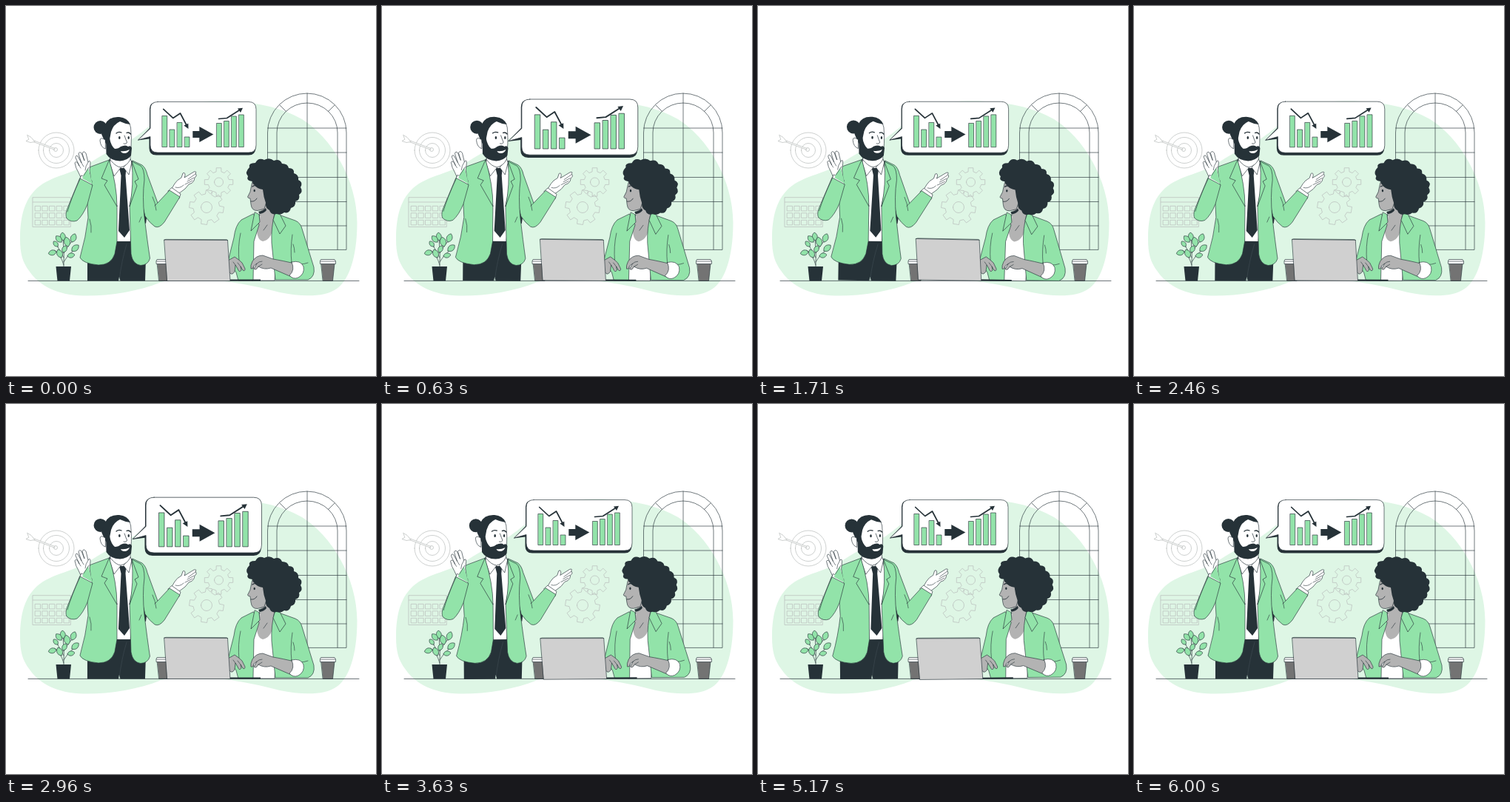
An HTML page with a canvas that plays this animation: 500x500 px, repeating every 6.04 s.

```html
<!DOCTYPE html>
<html lang="en">
<head>
<meta charset="utf-8">
<title>Business talk</title>
<style>
html, body { margin: 0; width: 100%; height: 100%; overflow: hidden; background: #fff; }
canvas { display: block; width: 500px; height: 500px; }
</style>
</head>
<body>
<canvas id="stage"></canvas>
<script>
const DARK = '#263238', GREEN = '#92e3a9', PALE = '#def6e5', SKIN = '#b3b3b3', GREY = '#b8bcba', WHITE = '#fff';
const LOOP = 6040, CYCLE = 6000;
const canvas = document.getElementById('stage');
const ctx = canvas.getContext('2d');
const ratio = window.devicePixelRatio || 1;
canvas.width = canvas.height = 500 * ratio;

// Each part: path, fill, stroke, line width
const part = (d, fill, stroke, width = 0.65) => ({ path: new Path2D(d), fill, stroke, width });
const inked = (d, fill) => part(d, fill, DARK);
const line = (d, width = 0.65, color = DARK) => part(d, null, color, width);
const solid = (d, fill = DARK) => part(d, fill);

function draw(parts) {
  for (const p of parts) {
    if (p.fill) { ctx.fillStyle = p.fill; ctx.fill(p.path); }
    if (p.stroke) { ctx.strokeStyle = p.stroke; ctx.lineWidth = p.width; ctx.stroke(p.path); }
  }
}

const circle = (x, y, r) => `M${x - r} ${y}a${r} ${r} 0 1 0 ${2 * r} 0a${r} ${r} 0 1 0 ${-2 * r} 0Z`;
const box = (x, y, w, h) => `M${x} ${y}h${w}v${h}h${-w}Z`;

function gear(x, y, outer, body, hole, turn) {
  let d = '';
  for (let i = 0; i < 8; i++) {
    const a = turn + i * Math.PI / 4;
    for (const [da, r] of [[-0.24, body], [-0.17, outer], [0.17, outer], [0.24, body]]) {
      d += `${d ? 'L' : 'M'}${x + r * Math.cos(a + da)} ${y + r * Math.sin(a + da)}`;
    }
  }
  return line(d + 'Z' + circle(x, y, hole), 0.7, GREY);
}

function leaf(x, y, angle, len) {
  const c = Math.cos(angle), s = Math.sin(angle);
  const at = (u, v) => `${x + (u * c - v * s) * len} ${y + (u * s + v * c) * len}`;
  return inked(`M${at(0, 0)}C${at(0.25, -0.45)} ${at(0.75, -0.4)} ${at(1, 0)}C${at(0.75, 0.4)} ${at(0.25, 0.45)} ${at(0, 0)}`, GREEN);
}

function cup(x) {
  return [
    inked(`M${x - 9} 348H${x + 9}L${x + 6.5} 371.4H${x - 6.5}Z`, '#737373'),
    inked(`M${x - 9} 342.5H${x + 9}L${x + 10.5} 345V348.5H${x - 10.5}V345Z`, WHITE),
    line(`M${x - 10} 345H${x + 10}`, 0.6)
  ];
}

const calendar = [line(box(36.3, 258.7, 51, 39.8) + 'M36.3 265H87.3', 0.7, GREY)];
for (let row = 0; row < 3; row++) {
  for (let col = 0; col < 5; col++) {
    calendar.push(line(box(39.5 + col * 9.7, 270.3 + row * 9.5, 7, 6.6), 0.7, GREY));
  }
}

const scene = [
  solid('M19 315C19 280 27 255 50 240C72 227 92 226 115 211C135 198 152 190 172 179C200 160 225 128.5 285 128.5C335 128 372 137 400 153C440 178 474.500 235 474.500 293C474.500 340 463 371 447 382C430 394 400 393 370 387C320 373 250 363 210 373C178 386 140 392 105 391.500C70 391 45 378 32 359C22 346 19 334 19 315Z', PALE),
  line('M353.500 329V171A53.250 53 0 0 1 460 171V329ZM366 329V171A41 40 0 0 1 448 171V329'),
  line('M407 118V329M353.500 165H460M353.500 198H460M353.500 231.500H460M353.500 264.500H460M353.500 297H460M370 134L378.500 142.500M444 134L435.500 142.500'),
  line(circle(68, 195, 24) + circle(68, 195, 17.5) + circle(68, 195, 9.5) + circle(67, 194, 2.5), 0.7, GREY),
  part('M35.500 181L66 192.500L65.500 194.200L34.900 182.700Z', WHITE, GREY, 0.7),
  part('M29 174.500L34 177.500L39 183.500L33 184.500L27 182.500L30.500 180.500Z', WHITE, GREY, 0.7),
  ...calendar,
  gear(271, 272, 23.5, 18, 7.5, 0.15),
  gear(287.5, 238, 19.5, 14.5, 6, 0),
  line('M78 352Q79 334 77 314M78 350Q74 336 66 330M78 346Q84 336 92 330M78 340Q73 330 69 324M78 334Q83 325 89 318'),
  leaf(77.5, 317, -1.7, 11), leaf(70, 325, -2.25, 9), leaf(75, 319, -2.3, 11),
  leaf(89, 319, -1.2, 12), leaf(84, 325, -1.8, 13), leaf(89, 331, -0.7, 12),
  leaf(83, 338, -0.2, 10), leaf(68, 332, 2.9, 11), leaf(75, 340, -2, 12), leaf(77, 333, -1.15, 10),
  solid('M67.500 352H88L86 371.400H69.500Z'),
  ...cup(213.5), ...cup(435),
  line('M30 371.400H477', 0.7)
];

const bar = (x, top) => inked(box(x, top, 6.5, 190.5 - top), GREEN);
const bubble = [
  solid('M202 130H330Q338 131 337.500 139V192Q337 201.500 328 201.500H203Q193.500 201.500 193.500 192V179.500L178 181.500L194 165V139Q194 131 202 130Z'),
  inked('M205 129.500H328Q338 129.500 338 139.500V188Q338 198 328 198H205Q195 198 195 188V176.500L178.500 181L195 165.500V139.500Q195 129.500 205 129.500Z', WHITE),
  bar(211.2, 148.5), bar(221.3, 167), bar(231.4, 157.5), bar(241.5, 177),
  bar(284.8, 158.5), bar(294.8, 155.5), bar(304.8, 149), bar(314.8, 147),
  line('M212.700 139.500L225.700 151.500L235.500 145L244.500 162', 1.7),
  solid('M246.500 166L240.300 161.500L246.300 158.800Z'),
  line('M287.500 152.500L298.500 151.500L316.500 140', 1.7),
  solid('M320 137.800L313 138.500L317 144Z'),
  solid('M252.300 169H261.300V163L280.300 173.500L261.300 184V178H252.300Z')
];

const man = [
  solid('M184 245L191 280L189 294L184 292Z'),
  // shirt, trousers and tie
  inked('M141 206L168 207L176 240L168 320H150L138 235Z', WHITE),
  solid('M148 318H170L189 340L188 371.500H154.500L153 366L152 371.500H110V340Z'),
  line('M163 322Q156 345 153 371', 0.4, '#4c5a61'),
  solid('M153 219L162.500 219L161.500 229L167 303L160 313L152 304L155.500 229Z'),
  inked('M141.500 206L140 212L146 230L155 218.500Z', WHITE),
  inked('M168 207L170 211L166 228L159 218.500Z', WHITE),
  // arm with open palm
  inked('M222 250L228 240Q231 235 237 232L239 226Q242 224 242 229L241 232L254 224Q258 223 256 226L257 228Q258 230 255 232L254 236Q252 240 247 241L242 247L234 253Z', WHITE),
  line('M246 234L256 227M245 237L254 232M242 241L252 236M229 245Q235 247 240 242', 0.6),
  inked('M219 250L224 245.500L236 254L234 260Z', WHITE),
  inked('M171 209L184 215Q189 219 191 228L205 266L221 249L235 258L214 292Q207 301 201 298Q194 293 188 284Z', GREEN),
  line('M205 266L201 270M198 258Q202 266 203 276', 0.6),
  // jacket
  inked('M139.500 208L115 217Q108 220 105 230L110 268L111 286Q108 312 100 340Q104 348 125 350Q142 350 147 335L150 318V270L136 232Z', GREEN),
  inked('M170 210L182 216Q187 220 187 235Q184 257 187 285Q191 318 194.500 341Q192 350 182 350.500Q171 349 169 335L167 270L175 232Z', GREEN),
  inked('M139.500 208L129 233L137 236L133 242L150 271Q150 242 139.500 208Z', GREEN),
  inked('M170 210L179 234L174 237L177 243L167 271Q173 242 170 210Z', GREEN),
  line('M113 288Q116 297 115 306M183 285L180 292', 0.6),
  // raised arm
  inked('M103 236L98 225Q94 219 93 212Q94 209 97 212L99 216L94 205Q94 201 97 203L102 212L98 200Q99 196 102 199L106 209L103 199Q105 195 108 199L111 211Q114 207 114 213L113 222L115 237Z', WHITE),
  line('M99 216L101 219M102 212L105 217M111 211Q107 217 107 222', 0.6),
  inked('M102 229Q108 231 116 236L116 244L99 237Z', WHITE),
  solid('M111 219L105 228L103 233L117 241Z', GREEN),
  inked('M100 233L117 242L110 268Q104 283 96 290Q88 293 82 287Q80 283 82 276Z', GREEN),
  line('M100 234Q88 260 83 278M112 218L105 229', 0.6),
  // head
  inked('M140 180L141 208Q148 217 155 218Q164 216 168 207V190Z', WHITE),
  inked('M136 166Q139 154 153 152Q167 154 168.500 164Q170 180 169 192L160 205L140 200Q135 185 136 166Z', WHITE),
  solid(circle(127.5, 164, 9)),
  solid('M134 160Q139 149 153 150Q164 151 168 160Q160 159 154 156Q145 160 142 170Q140 178 139.500 188L135 186Q131 178 129 173Z'),
  inked('M134 181Q127 176 127 182Q128 191 134 193Z', WHITE),
  solid('M135 179L140 179Q142 189 147 193Q152 193 155 190Q162 187 165 190Q169 188 170 192L169 202Q164 209 154 209.500Q141 209 135.500 200Z'),
  solid('M155 196Q161 197 167 194Q165 199 160 199Q156 199 155 196Z', WHITE),
  line('M149 172Q152 169.500 156 171M163 171.500Q166 170 168.500 173', 1.3),
  solid('M152 178a1.300 2 0 1 0 2.600 0a1.300 2 0 1 0 -2.600 0M164.500 178a1.200 2 0 1 0 2.400 0a1.200 2 0 1 0 -2.400 0'),
  line('M160 175Q162 181 163.500 184Q163 187 159 186', 0.7)
];

const woman = [
  // jacket, shirt, neck
  inked('M335 283L362 282L366 330L363 371H332L334 318Z', WHITE),
  solid('M345 268L343 288L339 301Q339 316 347 318Q358 316 361 300L364 283V272Z', SKIN),
  line('M343 277L342 290L338 302M348 303L353 296', 0.6),
  inked('M334 281L318 289Q310 296 308 313L300 345L311 360L314 371H334L335 318L342 296Z', GREEN),
  inked('M363 280L391 290Q398 293 400 301L416 353Q418 366 408 370H364L359 320Q358 300 363 280Z', GREEN),
  inked('M336 279L331 304L343 292L342 282Z', GREEN),
  inked('M364 279L361 289L370 308L378 297L370 281Z', GREEN),
  line('M317 307Q313 325 315 345M387 309Q384 329 386 347Q397 351 408 347M388 322Q390 327 390 333', 0.6),
  // face and hair
  inked('M334 233Q331 245 330 251L326.500 258Q327 260 330 260L331 268Q332 277 340 276.500L349 274L358 245Z', SKIN),
  solid('M341 278Q347 277 351 273L352 276Q349 280 343 281Z'),
  solid('M333 237q-9 -1 -6 -7q-5 -5 2 -12q-2 -6 8 -6q4 -8 12 -4q7 -4 13 1q8 -3 11 4q8 0 9 6q8 0 7 7q7 2 6 9q7 3 3 10q4 6 -2 10q2 7 -5 9q1 7 -6 9q-2 8 -9 6q-5 4 -10 2q-8 2 -10 -5q-6 -3 -5 -10q-3 -8 -4 -18q-8 -1 -11 -6q-3 -1 -3 -5Z'),
  line('M333 244Q335 242 338 243', 1.3),
  solid('M334.500 249.500a1.200 1.800 0 1 0 2.400 0a1.200 1.800 0 1 0 -2.400 0'),
  line('M331 264Q336 265 339 260', 0.8),
  // hands
  inked('M300 344L309 339Q315 343 319 347L323 355Q323 359 320 357L317 352L318 357Q315 361 313 355L310 350L309 359Q305 365 302 360Z', SKIN),
  line('M310 350L307 346M317 352L313 347', 0.6),
  inked('M390 348Q373 344 361 342L347 337Q338 337 333 345Q330 351 331 355Q334 356 335 351L339 348L335 355Q338 358 341 352Q349 357 358 354L388 367Z', SKIN),
  line('M339 348Q342 345 346 345M341 352L346 349', 0.6),
  inked('M386 346Q398 343 402 352Q404 362 395 367Q388 370 383 364Q391 357 386 346Z', WHITE),
  // laptop
  solid('M300 369.500H344V371.500H300Z'),
  inked('M214 316L299.500 316.500L303 371.500H218Z', '#d0d0d0'),
  line('M214 316L216 315.400L298 315.700L299.500 316.500')
];

// Linear interpolation over [time share, value] keys
function tween(keys, p) {
  let i = 1;
  while (i < keys.length - 1 && p > keys[i][0]) i++;
  const [a, u] = keys[i - 1], [b, v] = keys[i];
  return u + (v - u) * (p - a) / (b - a);
}

const BEAT = [[0, 1], [0.1, 1.1], [0.3, 1], [0.4, 1], [0.5, 1.1], [0.6, 1], [1, 1]];
const SWAY = [[0, 0], [0.25, 1], [0.75, -1], [1, 0]];

function about(x, y, scale, degrees, parts) {
  ctx.save();
  ctx.translate(x, y);
  ctx.rotate(degrees * Math.PI / 180);
  ctx.scale(scale, scale);
  ctx.translate(-x, -y);
  draw(parts);
  ctx.restore();
}

function frame(now) {
  const p = Math.min(now % LOOP / CYCLE, 1);
  const tilt = tween(SWAY, p);
  ctx.setTransform(ratio, 0, 0, ratio, 0, 0);
  ctx.fillStyle = WHITE;
  ctx.fillRect(0, 0, 500, 500);
  ctx.lineJoin = ctx.lineCap = 'round';
  draw(scene);
  about(258, 165.3, tween(BEAT, p), 0, bubble);
  about(169, 261, 1, tilt, man);
  about(315.5, 289, 1, tilt, woman);
  requestAnimationFrame(frame);
}

requestAnimationFrame(frame);
</script>
</body>
</html>
```
